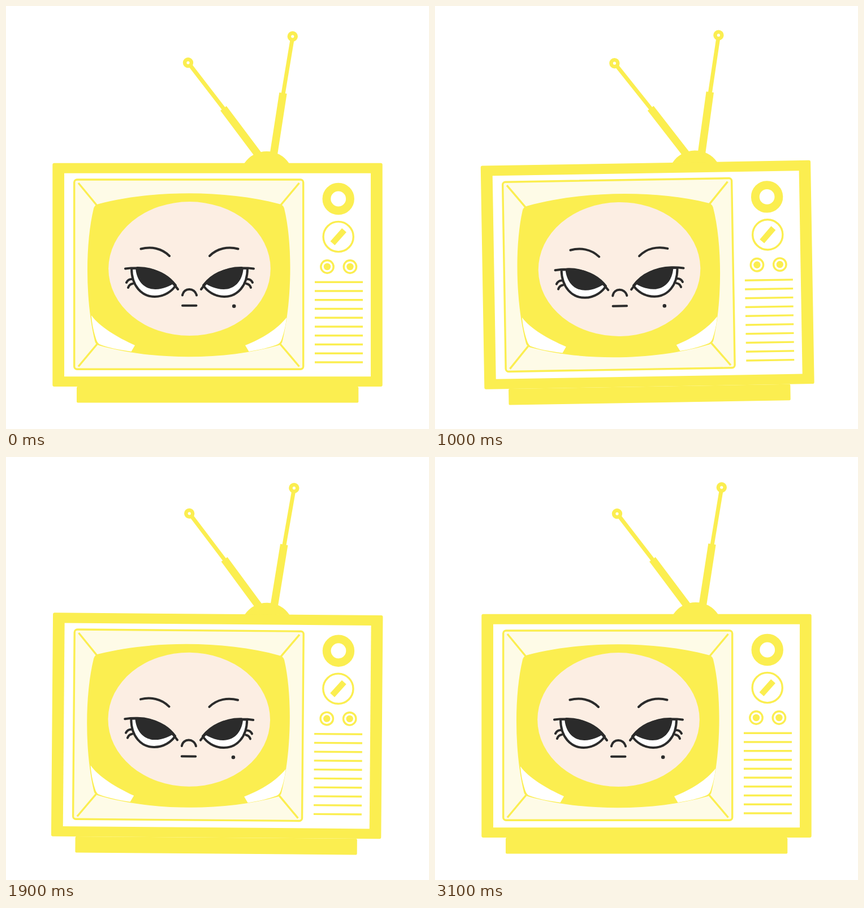
Recreate the animation shown at these times as an HTML page. Size 748 by 748 pixels, loop 5000 ms.

```html
<!DOCTYPE html>
<html lang="en">
<head>
<meta charset="utf-8">
<title>Wobbling television</title>
<style>
  html, body { margin: 0; width: 100%; height: 100%; overflow: hidden; background: #fff; }
  svg { display: block; width: 100%; height: 100%; }
  .fill { fill: #fbee50; }
  .line { fill: none; stroke: #fbee50; stroke-width: 3.4; }
  .round { stroke-linecap: round; }
  .ink { fill: none; stroke: #2b2b2b; stroke-width: 4; stroke-linecap: round; stroke-linejoin: round; }
</style>
</head>
<body>
<svg viewBox="0 0 748 748">
  <defs>
    <g id="eye">
      <path class="ink" d="M238.5 429.5C256 425 275 428 289 442"/>
      <path class="ink" style="fill:#fff" d="M222 464C222 495 240 514 263 514C280 514 294 504 300 494C285 474 260 462 222 464Z"/>
      <path fill="#2b2b2b" d="M229 463C231 488 246 501 264 501C279 501 291 494 298 490C282 472 258 462 229 463Z"/>
      <path class="ink" d="M211 464.5Q221 463 231 463C262 462 287 477 304 501M222 483Q216 483 213 489M224 491Q218 492 216 498"/>
    </g>
  </defs>
  <g id="tv">
    <!-- antennas -->
    <path class="fill" d="M421.5 279V278A47.6 47.6 0 0 1 500.5 278V279Z"/>
    <path class="line" stroke-width="7" style="stroke-width:7" d="M325.5 104.500L386 183M506 60L490 156"/>
    <path class="line" style="stroke-width:13.5" d="M384.500 181L449 267M490 154L473 264"/>
    <g class="line" style="stroke-width:6.600">
      <circle cx="322" cy="100.300" r="5.900"/>
      <circle cx="506.800" cy="53.800" r="5.900"/>
    </g>

    <!-- cabinet -->
    <rect class="fill" x="125" y="673" width="498.300" height="28.500" rx="2"/>
    <rect class="fill" x="82.300" y="277.700" width="583.400" height="395.300" rx="3"/>
    <rect x="103" y="295.700" width="542" height="359.500" fill="#fff"/>
    <rect class="line" style="fill:#fefbe7" x="120.700" y="307" width="405" height="335.300" rx="5"/>
    <path class="line" d="M128 313L161 353M518.500 313L485 353M128 637.500L161 598M518.500 637.500L485 598"/>

    <!-- screen -->
    <path class="fill" d="M164 350C260 325 388 325 483 350Q490 351 492 358C507 420 506 520 489 592Q488 598 482 600C388 627 258 627 164 600Q158 598 157 592C140 520 140 420 155 358Q157 351 164 350Z"/>
    <path fill="#fff" d="M151 547C165 567 197 586 228 600L221.500 611C200 608 180 604 165 598Q161 595 159 588C154 572 152 560 151 547ZM496 551C480 571 454 588 423 600L429.500 611C448 608 466 604 481 598Q486 595 488 588C493 573 495 562 496 551Z"/>

    <!-- face -->
    <ellipse cx="324.500" cy="464.600" rx="143.300" ry="118.500" fill="#fceee3"/>
    <use href="#eye"/>
    <use href="#eye" transform="translate(649) scale(-1 1)"/>
    <path class="ink" d="M312 511.500C314 497.500 334 497.500 337 511.500M312 529.700H336.500"/>
    <circle cx="403.200" cy="530.800" r="3.300" fill="#2b2b2b"/>

    <!-- controls -->
    <circle class="line" style="stroke-width:14.800" cx="587.700" cy="341" r="20.800"/>
    <circle class="line" cx="587.700" cy="408" r="26.600"/>
    <path class="line" style="stroke-width:10.500" d="M577.500 419.500L598 396.500"/>
    <g class="line">
      <circle cx="568" cy="461" r="11.200"/>
      <circle cx="608.400" cy="461" r="11.200"/>
    </g>
    <g class="fill">
      <circle cx="568" cy="461" r="6.200"/>
      <circle cx="608.400" cy="461" r="6.200"/>
    </g>
    <path id="grille" class="line"/>
  </g>
</svg>
<script>
const LOOP = 5000, STEP = 100;
// [time in ms, tilt in degrees]
const keys = [
  [0, 0], [500, -2], [700, -2], [1300, 0.74], [1600, 2], [1700, 1.77], [1800, 1.35],
  [2100, -0.92], [2200, -0.79], [2400, -0.2], [2600, 0.72], [2750, 0.95],
  [3000, 0.12], [3100, 0], [LOOP, 0]
];
const tv = document.getElementById('tv');

document.getElementById('grille').setAttribute('d',
  Array.from({ length: 10 }, (_, i) => `M546 ${488.2 + i * 15.75}H631`).join(''));

// Slope at a key: flat at turning points, otherwise the mean slope of its neighbours.
function slope(i) {
  const a = keys[i - 1], b = keys[i], c = keys[i + 1];
  if (!a || !c || (b[1] - a[1]) * (c[1] - b[1]) <= 0) return 0;
  return (c[1] - a[1]) / (c[0] - a[0]);
}

function tilt(t) {
  const i = keys.findIndex(k => k[0] > t) - 1;
  const [t0, a] = keys[i], [t1, b] = keys[i + 1];
  const span = t1 - t0, u = (t - t0) / span, v = 1 - u;
  return a + (b - a) * u * u * (3 - 2 * u)
    + span * u * v * (slope(i) * v - slope(i + 1) * u);
}

function draw(now) {
  const t = Math.floor(now % LOOP / STEP) * STEP;
  tv.setAttribute('transform', `rotate(${tilt(t).toFixed(3)} 374 374)`);
  requestAnimationFrame(() => draw(performance.now()));
}
draw(0);
</script>
</body>
</html>
```
